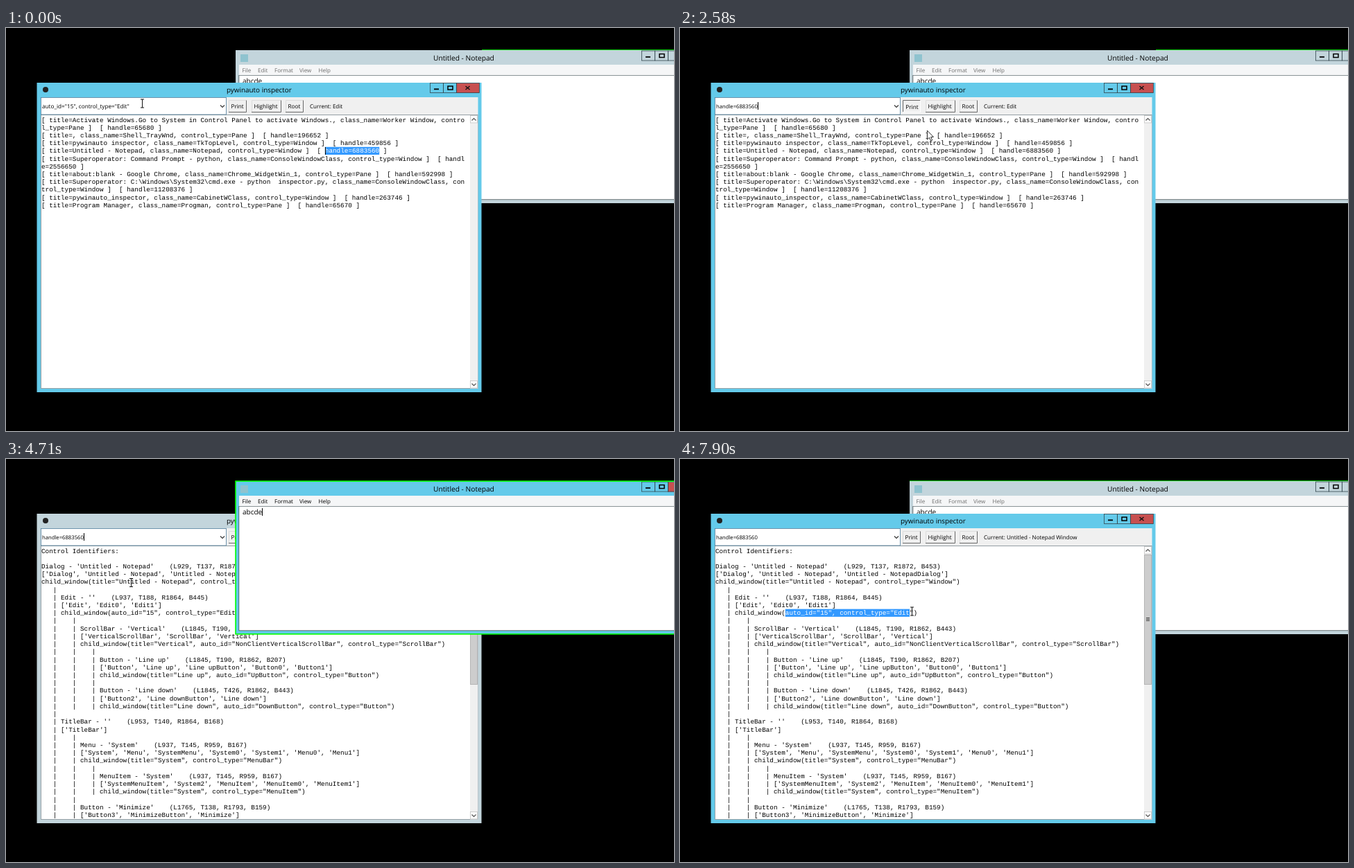
These frames come from a looping animation (963 px wide and 582 px high, 8000 ms). An HTML page with a canvas:

```html
<!DOCTYPE html>
<html lang="en">
<head>
<meta charset="utf-8">
<title>pywinauto inspector</title>
<style>
html, body { margin: 0; width: 963px; height: 582px; overflow: hidden; background: #000; }
canvas { display: block; }
</style>
</head>
<body>
<canvas id="stage" width="963" height="582"></canvas>
<script>
const ctx = document.getElementById('stage').getContext('2d');
const LOOP = 8000;
const UI = '"Open Sans", "Noto Sans", sans-serif';
const MONO = '"Liberation Mono", monospace';
const CELL = 5.6, ROW = 11.22, LEFT = 51, TOP = 126.9;
const ACTIVE = '#64caea', IDLE = '#c3d5dc', SELECT = '#3399ff', GREEN = '#00ff00';

const windowList = [
  '[ title=Activate Windows.Go to System in Control Panel to activate Windows., class_name=Worker Window, contro',
  'l_type=Pane ]  [ handle=65680 ]',
  '[ title=, class_name=Shell_TrayWnd, control_type=Pane ]  [ handle=196652 ]',
  '[ title=pywinauto inspector, class_name=TkTopLevel, control_type=Window ]  [ handle=459856 ]',
  '[ title=Untitled - Notepad, class_name=Notepad, control_type=Window ]  [ handle=6883560 ]',
  '[ title=Superoperator: Command Prompt - python, class_name=ConsoleWindowClass, control_type=Window ]  [ handl',
  'e=2556650 ]',
  '[ title=about:blank - Google Chrome, class_name=Chrome_WidgetWin_1, control_type=Pane ]  [ handle=592998 ]',
  '[ title=Superoperator: C:\\Windows\\System32\\cmd.exe - python  inspector.py, class_name=ConsoleWindowClass, con',
  'trol_type=Window ]  [ handle=11208376 ]',
  '[ title=pywinauto_inspector, class_name=CabinetWClass, control_type=Window ]  [ handle=263746 ]',
  '[ title=Program Manager, class_name=Progman, control_type=Pane ]  [ handle=65670 ]'
];

// The leading digit is the nesting depth.
const tree = `0Control Identifiers:
0
0Dialog - 'Untitled - Notepad'    (L929, T137, R1872, B453)
0['Dialog', 'Untitled - Notepad', 'Untitled - NotepadDialog']
0child_window(title="Untitled - Notepad", control_type="Window")
1
1Edit - ''    (L937, T188, R1864, B445)
1['Edit', 'Edit0', 'Edit1']
1child_window(auto_id="15", control_type="Edit")
2
2ScrollBar - 'Vertical'    (L1845, T190, R1862, B443)
2['VerticalScrollBar', 'ScrollBar', 'Vertical']
2child_window(title="Vertical", auto_id="NonClientVerticalScrollBar", control_type="ScrollBar")
3
3Button - 'Line up'    (L1845, T190, R1862, B207)
3['Button', 'Line up', 'Line upButton', 'Button0', 'Button1']
3child_window(title="Line up", auto_id="UpButton", control_type="Button")
3
3Button - 'Line down'    (L1845, T426, R1862, B443)
3['Button2', 'Line downButton', 'Line down']
3child_window(title="Line down", auto_id="DownButton", control_type="Button")
1
1TitleBar - ''    (L953, T140, R1864, B168)
1['TitleBar']
2
2Menu - 'System'    (L937, T145, R959, B167)
2['System', 'Menu', 'SystemMenu', 'System0', 'System1', 'Menu0', 'Menu1']
2child_window(title="System", control_type="MenuBar")
3
3MenuItem - 'System'    (L937, T145, R959, B167)
3['SystemMenuItem', 'System2', 'MenuItem', 'MenuItem0', 'MenuItem1']
3child_window(title="System", control_type="MenuItem")
2
2Button - 'Minimize'    (L1765, T138, R1793, B159)
2['Button3', 'MinimizeButton', 'Minimize']`.split('\n').map(line => {
  const depth = +line[0];
  return (depth ? '   |' + '    |'.repeat(depth - 1) + ' ' : '') + line.slice(1);
});

// Pointer: start time, x, y
const pointer = [
  [0, 196, 109], [250, 128, 90.5], [500, 56, 113.5], [770, 136, 163], [1020, 276, 161],
  [1290, 318, 140], [1540, 344, 112], [2580, 356, 148], [3110, 356, 118], [3380, 363, 114],
  [3660, 367, 115], [3910, 367, 119.5], [4180, 173, 205], [4430, 192, 239], [4710, 180, 178.5],
  [4980, 180, 176.5], [5260, 149, 176.5], [5530, 177, 190], [5780, 123, 205], [6030, 126, 223.5],
  [6300, 117, 221.5], [6570, 150, 212], [6820, 177, 178.5], [7090, 155, 222],
  [7340, 364, 225], [7620, 340, 222], [7900, 334, 220]
];

const during = (t, a, b) => t >= a && t < b;

function box(x, y, w, h, fill) {
  ctx.fillStyle = fill;
  ctx.fillRect(x, y, w, h);
}

function frame(x, y, w, h, color, width = 1) {
  ctx.strokeStyle = color;
  ctx.lineWidth = width;
  ctx.strokeRect(x + .5, y + .5, w - 1, h - 1);
}

function path(points, color, width = 1) {
  ctx.strokeStyle = color;
  ctx.lineWidth = width;
  ctx.beginPath();
  points.forEach(([x, y]) => ctx.lineTo(x, y));
  ctx.stroke();
}

function label(str, x, y, size, color = '#000', family = UI) {
  ctx.font = size + 'px ' + family;
  ctx.textRendering = 'geometricPrecision';
  ctx.fillStyle = color;
  ctx.fillText(str, x, y);
}

function mono(str, col, row, color) {
  label(str, LEFT + col * CELL, TOP + row * ROW + 8.6, CELL / .6001, color, MONO);
}

function chevron(x, y, dir, color) {
  path([[x - 3, y - 1.5 * dir], [x, y + 1.5 * dir], [x + 3, y - 1.5 * dir]], color, 1.2);
}

function captionButtons(x, y, active) {
  const edge = '#34474f';
  box(x + 38, y, 33, 14, active ? '#c75050' : IDLE);
  frame(x, y - 1, 20, 15, edge, .8);
  frame(x + 19, y - 1, 20, 15, edge, .8);
  frame(x + 38, y - 1, 34, 15, edge, .8);
  box(x + 6, y + 7.4, 7, 1.8, '#000');
  ctx.strokeStyle = '#000';
  ctx.lineWidth = 1.5;
  ctx.strokeRect(x + 26, y + 4, 7, 5);
  const cx = x + 54.5, cy = y + 6.5;
  path([[cx - 3, cy - 2.5], [cx + 3, cy + 2.5]], '#111', 1.4);
  path([[cx + 3, cy - 2.5], [cx - 3, cy + 2.5]], '#111', 1.4);
}

function notepad(active) {
  const skin = active ? ACTIVE : IDLE;
  box(331, 32, 632, 221, skin);
  box(338, 38, 11, 11, '#8fc3cf');
  label('Untitled - Notepad', 616, 47, 10.2);
  captionButtons(916, 33.5, active);
  box(336, 53, 627, 15, '#f5f6f7');
  box(336, 68, 627, 180, '#fff');
  box(335.4, 68, .8, 180, '#3f4c50');
  box(336, 68, 627, .8, '#6c787c');
  box(336, 247.4, 627, .8, '#3f4c50');
  const names = { File: 340.5, Edit: 363, Format: 387, View: 423, Help: 450.5 };
  for (const name in names) label(name, names[name], 64, 8, active ? '#000' : '#6d6d6d');
  label('abcde', 341, 80, 10);
  if (active) box(369, 71, 1, 11, '#000');
}

function button(str, x, w, pressed) {
  box(x, 104, w, 18, '#f0f0f0');
  const dark = '#696969', light = '#fff', right = x + w - .5;
  path([[x + .5, 121.5], [x + .5, 104.5], [right, 104.5]], pressed ? dark : '#dcdcdc');
  path([[right, 104.5], [right, 121.5], [x, 121.5]], pressed ? light : dark);
  const shift = pressed ? .8 : 0;
  label(str, x + 3.5 + shift, 116 + shift, 8.2);
}

function combo(t) {
  box(50, 100, 268, 25, '#fff');
  frame(50, 100, 268, 25.5, '#4d7a9a', .8);
  chevron(312, 113, 1, '#333');
  if (t < 1020) {
    const str = 'auto_id="15", control_type="Edit"', size = 8.18;
    label(str, 52, 116, size);
    const from = t >= 500 ? 52 : t >= 250 ? 128 : 178;
    if (from < 178) {
      ctx.save();
      ctx.beginPath();
      ctx.rect(from, 107, 178 - from, 12);
      ctx.clip();
      box(from, 107, 126, 12, SELECT);
      label(str, 52, 116, size, '#fff');
      ctx.restore();
      box(from, 107, 1, 12, '#000');
    }
    return;
  }
  label('handle=6883560', 52, 116, 7.7);
  const hidden = during(t, 1290, 1540) || during(t, 1810, 2060) || t >= 4980;
  if (!hidden) box(112, 107, 1, 11, '#000');
}

function scrollbar(loaded) {
  box(669, 126, 11, 394, '#f0f0f0');
  for (const [y, dir] of [[126, -1], [509, 1]]) {
    box(669, y, 11, 11.5, '#fafafa');
    frame(669, y, 11, 11.5, '#c4c4c4', .8);
    chevron(674.5, y + 6, dir, '#555');
  }
  if (!loaded) return;
  box(669, 138, 11, 188, '#cdcdcd');
  frame(669, 138, 11, 188, '#b0b0b0', .8);
  for (let i = 0; i < 3; i++) box(672, 229 + i * 2, 5, 1, '#444');
}

function highlight(lines, row, from, to) {
  box(LEFT + from * CELL, TOP + row * ROW, (to - from) * CELL, ROW, SELECT);
  mono(lines[row].slice(from, to), from, row, '#fff');
}

function inspector(t, active) {
  const loaded = t >= 2860, lines = loaded ? tree : windowList;
  box(44.5, 79, 641, 447, active ? ACTIVE : IDLE);
  ctx.fillStyle = '#222';
  ctx.beginPath();
  ctx.arc(57, 89, 4, 0, 7);
  ctx.fill();
  label('pywinauto inspector', 318, 93, 9.9);
  captionButtons(611, 80, active);
  box(50, 100, 630.5, 26, '#f0f0f0');
  box(50, 126, 630.5, 395, '#fff');
  frame(50, 125, 630.5, 396, '#7d8b91', .8);
  combo(t);
  button('Print', 321, 26, during(t, 2330, 2860));
  button('Highlight', 354, 43);
  button('Root', 403, 26);
  label('Current: ' + (loaded ? 'Untitled - Notepad Window' : 'Edit'), 438, 116, 8.04);
  lines.forEach((line, row) => {
    const sel = t < 250 && row === 4 ? [73, 87]
      : t >= 7340 && row === 8 ? [18, t < 7620 ? 52 : t < 7900 ? 51 : 50] : null;
    if (!sel) return mono(line, 0, row);
    mono(line.slice(0, sel[0]), 0, row);
    highlight(lines, row, ...sel);
    mono(line.slice(sel[1]), sel[1], row);
    if (t < 250) box(460, 172, 1, 11, '#000');
  });
  scrollbar(loaded);
}

function ibeam(x, y) {
  const cx = Math.floor(x) + .5;
  path([[cx, y - 6], [cx, y + 6]], '#111');
  for (const dy of [-6, 6]) {
    path([[cx - 2.5, y + dy], [cx + 2.5, y + dy]], '#111');
  }
}

function arrow(x, y) {
  ctx.beginPath();
  const shape = [[0, 0], [0, 13], [3, 10.3], [5.2, 15], [7.3, 14], [5.2, 9.6], [9, 9.3]];
  shape.forEach(([dx, dy]) => ctx.lineTo(x + dx + .4, y + dy));
  ctx.closePath();
  ctx.fillStyle = '#fff';
  ctx.fill();
  ctx.strokeStyle = '#111';
  ctx.lineWidth = .9;
  ctx.stroke();
}

function draw(t) {
  const raised = during(t, 3660, 4980);
  box(0, 0, 963, 582, '#000');
  if (raised) {
    inspector(t, false);
    notepad(true);
    ctx.strokeStyle = GREEN;
    ctx.lineWidth = 1.6;
    ctx.strokeRect(331, 32, 640, 220.8);
  } else {
    notepad(false);
    const start = t < 3660 ? 686 : 331;
    box(start, 31.2, 963 - start, .8, GREEN);
    inspector(t, true);
  }
  const [, x, y] = pointer.findLast(step => t >= step[0]);
  (during(t, 1540, 3660) ? arrow : ibeam)(x, y);
}

function tick(now) {
  draw(now % LOOP);
  requestAnimationFrame(tick);
}

draw(0);
requestAnimationFrame(tick);
</script>
</body>
</html>
```
